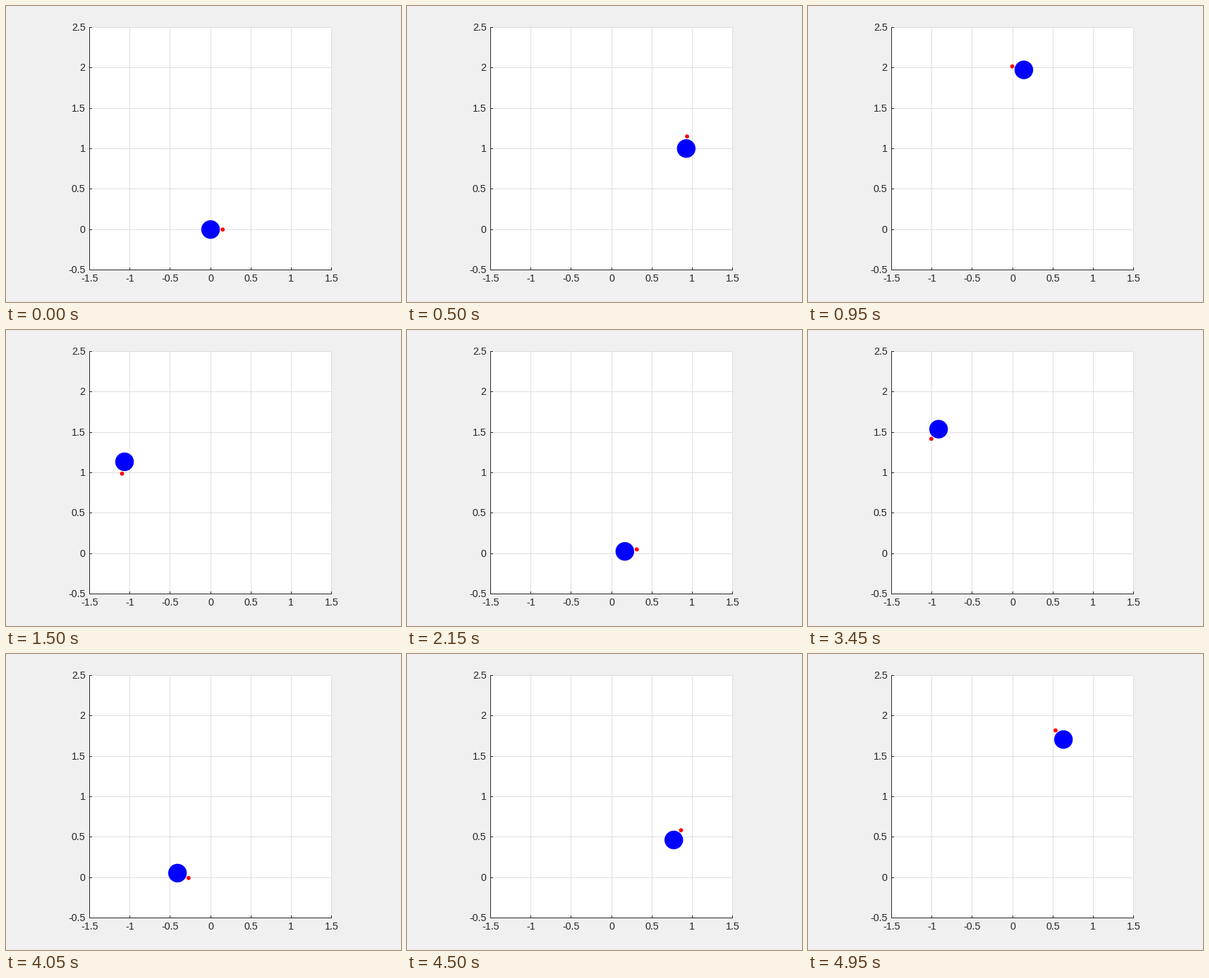
These frames come from a looping animation (560x420 px, 5 s). A matplotlib script:

```python
import matplotlib.pyplot as plt
import numpy as np
from matplotlib.animation import FuncAnimation
from matplotlib.patches import Circle, Rectangle

W, H, DPI = 560, 420, 100
FRAMES, INTERVAL = 100, 50
STEP = 0.15          # distance and turn per frame
NOSE = 0.15          # distance from body to heading mark
INK, GRID = "#262626", "#dfdfdf"
LEFT, RIGHT, TOP, BOTTOM = 118, 461, 30, 374

plt.rcParams["font.family"] = "Liberation Sans"
fig = plt.figure(figsize=(W / DPI, H / DPI), dpi=DPI, facecolor="#f0f0f0")
ax = fig.add_axes([0, 0, 1, 1])
ax.set_xlim(0, W)
ax.set_ylim(H, 0)
ax.axis("off")


def to_px(x, y):
    return (LEFT + 0.5 + (x + 1.5) * (RIGHT - LEFT) / 3,
            BOTTOM + 0.5 - (y + 0.5) * (BOTTOM - TOP) / 3)


def box(x, y, w, h, color, z):
    ax.add_patch(Rectangle((x, y), w, h, fc=color, lw=0,
                           antialiased=False, zorder=z))


def label(x, y, value, ha):
    ax.text(x, y, f"{value:g}", ha=ha, va="baseline", color=INK,
            fontsize=14.2 * 72 / DPI)


def draw_axes():
    w, h = RIGHT - LEFT + 1, BOTTOM - TOP + 1
    box(LEFT, TOP, w, h, "white", 0)
    for k in range(7):
        xv, yv = -1.5 + k / 2, -0.5 + k / 2
        px, py = to_px(xv, yv)
        col, row = int(px), int(py)
        box(col, TOP, 1, h, GRID, 1)
        box(LEFT, row, w, 1, GRID, 1)
        box(col, BOTTOM - 3, 1, 3, INK, 2)
        box(LEFT + 1, row, 3, 1, INK, 2)
        label(px, 391, xv, "center")
        label(112.5, row + 5, yv, "right")
    box(LEFT, TOP, 1, h, INK, 2)
    box(LEFT, BOTTOM, w, 1, INK, 2)


draw_axes()
body = ax.add_patch(Circle((0, 0), 13.2, fc="#0000ff", lw=0, zorder=4))
nose = ax.add_patch(Circle((0, 0), 2.9, fc="#ff0000", lw=0, zorder=5))


def update(i):
    turns = STEP * np.arange(1, i + 1)
    x, y = STEP * np.cos(turns).sum(), STEP * np.sin(turns).sum()
    heading = STEP * i
    body.center = to_px(x, y)
    nose.center = to_px(x + NOSE * np.cos(heading), y + NOSE * np.sin(heading))
    return body, nose


anim = FuncAnimation(fig, update, frames=FRAMES, interval=INTERVAL,
                     repeat=True, repeat_delay=0, blit=False)
plt.show()
```
